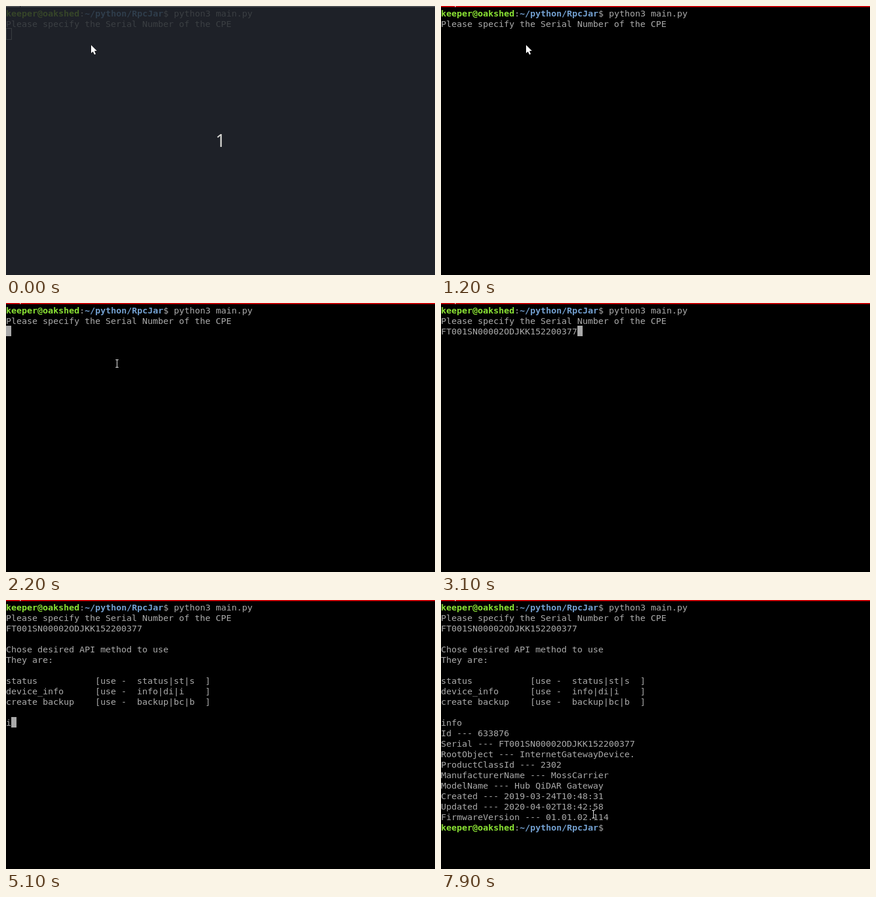
These frames come from a looping animation (736 px wide and 462 px high, 8 s). An HTML page with a canvas:

```html
<!DOCTYPE html>
<html lang="en">
<head>
<meta charset="utf-8">
<title>Terminal session</title>
<style>
  html, body { margin: 0; width: 100%; height: 100%; overflow: hidden; background: #000; }
  canvas { display: block; }
</style>
</head>
<body>
<canvas id="stage" width="736" height="462"></canvas>
<script>
const ctx = document.getElementById('stage').getContext('2d');
const W = 736, H = 462, LOOP = 8000;
const COL = 9, ROW = 18, TOP = 3, BASE = 15;
const MONO = '14.95px "DejaVu Sans Mono", monospace';
const SANS = '14.5px "Noto Sans", sans-serif';

const themes = {
  active:   { text: '#aaaaaa', user: '#8ae234', path: '#729fcf', bar: '#c80003', tick: '#ffffff' },
  inactive: { text: '#888888', user: '#6eb52a', path: '#5b7fa6', bar: '#c0bebf', tick: '#000000' },
  veiled:   { text: '#3b3f43', user: '#364529', path: '#2f3d4b', bar: '#484b50', tick: '#1e2128' }
};

const USER = 'keeper@oakshed', PATH = '~/python/RpcJar';
const SERIAL = 'FT001SN00002ODJKK152200377';
const option = (name, keys) => name.padEnd(17) + '[use -  ' + keys.padEnd(13) + ']';
const help = [
  'Chose desired API method to use',
  'They are:',
  '',
  option('status', 'status|st|s'),
  option('device_info', 'info|di|i'),
  option('create backup', 'backup|bc|b')
];
const report = [
  'Id --- 633876',
  'Serial --- ' + SERIAL,
  'RootObject --- InternetGatewayDevice.',
  'ProductClassId --- 2302',
  'ManufacturerName --- MossCarrier',
  'ModelName --- Hub QiDAR Gateway',
  'Created --- 2019-03-24T10:48:31',
  'Updated --- 2020-04-02T18:42:58',
  'FirmwareVersion --- 01.01.02.114'
];

// Menu rows: label, centre y, disabled
const menu = [
  ['Copy', 80, true], ['Paste', 103], ['Split Horizontally', 129], ['Split Vertically', 152],
  ['Open Tab', 175], ['Close', 201], ['Zoom terminal', 227, true], ['Maximize terminal', 250, true],
  ['Show scrollbar', 276], ['Preferences', 299], ['Encodings', 322]
];
const separators = [115, 187, 213, 262];

const between = (t, a, b) => t >= a && t < b;

function box(color, x, y, w, h) {
  ctx.fillStyle = color;
  ctx.fillRect(x, y, w, h);
}

function shape(points, fill, stroke) {
  ctx.beginPath();
  points.forEach(([x, y]) => ctx.lineTo(x, y));
  ctx.closePath();
  if (stroke) {
    ctx.strokeStyle = stroke;
    ctx.lineWidth = 1;
    ctx.stroke();
  }
  ctx.fillStyle = fill;
  ctx.fill();
}

function print(str, col, row, color, bold) {
  ctx.font = (bold ? 'bold ' : '') + MONO;
  ctx.fillStyle = color;
  ctx.fillText(str, col * COL, TOP + row * ROW + BASE);
}

function prompt(row, theme, command) {
  const colon = USER.length, dollar = colon + 1 + PATH.length;
  print(USER, 0, row, theme.user, true);
  print(':', colon, row, theme.text);
  print(PATH, colon + 1, row, theme.path, true);
  print('$ ' + command, dollar, row, theme.text);
}

function caretAt(t) {
  if (t < 2400) return [0, 2];
  if (t < 3500) return [SERIAL.length, 2];
  if (t < 5900) return [typed(t).length, 11];
  if (t < 6100) return [0, 12];
  return t < 6200 ? [0, 21] : [USER.length + PATH.length + 3, 21];
}

function caretHidden(t) {
  return between(t, 1100, 1500) || between(t, 2800, 3100) || between(t, 3700, 4300) ||
    between(t, 6300, 6900) || t >= 7500;
}

function typed(t) {
  if (t < 5100) return '';
  if (t < 5200) return 'i';
  return t < 5300 ? 'in' : 'info';
}

function drawTerminal(t, theme) {
  box(theme.bar, 0, 0, W, 2);
  box(theme.tick, 24, 0, 1, 2);
  prompt(0, theme, 'python3 main.py');
  print('Please specify the Serial Number of the CPE', 0, 1, theme.text);
  if (t >= 2400) print(SERIAL, 0, 2, theme.text);
  if (t >= 3500) help.forEach((line, i) => print(line, 0, 4 + i, theme.text));
  print(typed(t), 0, 11, theme.text);
  if (t >= 6100) report.forEach((line, i) => print(line, 0, 12 + i, theme.text));
  if (t >= 6200) prompt(21, theme, '');

  const [col, row] = caretAt(t), x = col * COL, y = TOP + row * ROW;
  if (theme !== themes.active) {
    ctx.strokeStyle = theme.text;
    ctx.lineWidth = 1;
    ctx.strokeRect(x + 0.5, y - 0.5, COL, ROW + 1);
  } else if (!caretHidden(t)) {
    box(theme.text, x, y, COL, ROW);
  }
}

function drawMenu(pointer) {
  box('#3c3b37', 147, 68, 177, 265);
  ctx.strokeStyle = '#4b4a45';
  ctx.lineWidth = 1;
  ctx.strokeRect(147.5, 68.5, 176, 264);
  for (const y of separators) {
    box('#32312e', 152, y, 167, 1);
    box('#454440', 152, y + 1, 167, 1);
  }
  ctx.font = SANS;
  for (const [label, y, disabled] of menu) {
    const hot = !disabled && pointer.x > 148 && Math.abs(pointer.y - y) < 11.5;
    if (hot) box('#f07746', 148, y - 11, 175, 23);
    ctx.fillStyle = disabled ? '#83827d' : hot ? '#ffffff' : '#dfdbd2';
    ctx.fillText(label, 173, y + 5);
  }
  box('#000', 153, 121, 14, 6);
  box('#000', 153, 129, 14, 6);
  box('#000', 153, 144, 6, 14);
  box('#000', 161, 144, 6, 14);
  ctx.beginPath();
  ctx.moveTo(158, 275);
  ctx.lineTo(160.5, 278);
  ctx.lineTo(166, 271.5);
  ctx.strokeStyle = '#fff';
  ctx.lineWidth = 2.2;
  ctx.stroke();
  shape([[309, 316], [314.5, 321], [309, 326]], '#dfdbd2');
}

// The pointer is sampled every 100 ms along eased moves.
function glide(t, start, end, from, to) {
  const p = Math.max(0, Math.min(1, (Math.floor(t / 100) * 100 - start) / (end - start)));
  const e = p * p * (3 - 2 * p);
  return { x: Math.round(from[0] + (to[0] - from[0]) * e), y: Math.round(from[1] + (to[1] - from[1]) * e) };
}

function pointerAt(t) {
  const home = [147, 68], paste = [190, 104], middle = [527, 178];
  if (t < 2200) return glide(t, 1500, 2000, home, paste);
  if (t < 2800) return glide(t, 2300, 2600, paste, middle);
  if (t < 3100) return { x: 690, y: 232 };
  if (t < 7300) return null;
  return glide(t, 7400, 7900, [688, 234], [261, 368]);
}

function drawArrow({ x, y }) {
  const outline = [[0, 0], [0, 14], [3.2, 11.2], [5.6, 16.5], [8, 15.4], [5.7, 10.2], [10, 10]];
  shape(outline.map(([dx, dy]) => [x - 1 + dx, y - 1 + dy]), '#fff', '#000');
}

function drawBeam({ x, y }) {
  box('#000', x - 1, y - 6, 3, 12);
  box('#fff', x, y - 6, 1, 12);
  box('#fff', x - 2, y - 7, 5, 1);
  box('#fff', x - 2, y + 6, 5, 1);
}

function draw(t) {
  const veiled = t < 200, menuOpen = between(t, 1500, 2200);
  const theme = veiled ? themes.veiled : t < 600 || menuOpen ? themes.inactive : themes.active;
  const pointer = pointerAt(t);
  box(veiled ? '#1e2128' : '#000', 0, 0, W, H);
  drawTerminal(t, theme);
  if (veiled) {
    ctx.font = '30px "Noto Sans", sans-serif';
    ctx.fillStyle = '#d6d6d2';
    ctx.textAlign = 'center';
    ctx.fillText('1', 368, 242);
    ctx.textAlign = 'left';
  }
  if (menuOpen) drawMenu(pointer);
  if (pointer) (veiled || between(t, 1200, 2200) ? drawArrow : drawBeam)(pointer);
}

const began = performance.now();
function tick() {
  draw((performance.now() - began) % LOOP);
  requestAnimationFrame(tick);
}
tick();
</script>
</body>
</html>
```
